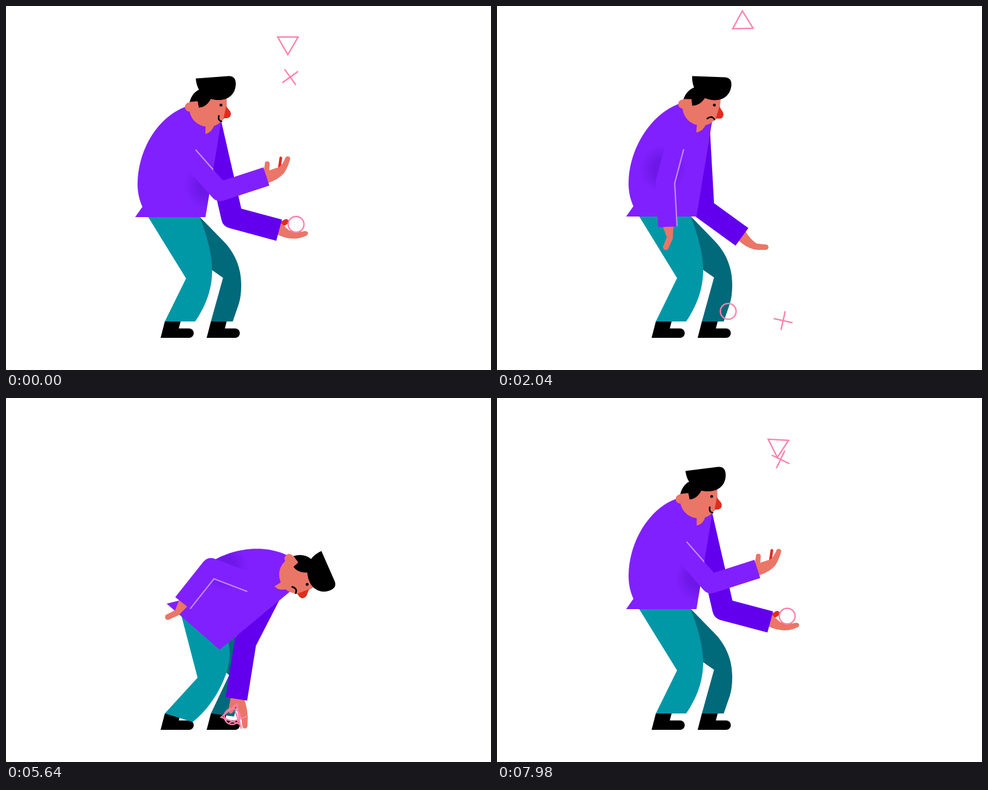
An HTML page that plays this animation: 800x600 px, repeating every 8000 ms.

```html
<!DOCTYPE html>
<html lang="en">
<head>
<meta charset="utf-8">
<title>Juggler</title>
<style>
html, body { margin: 0; width: 100%; height: 100%; overflow: hidden; background: #fff; }
svg { display: block; width: 100%; height: 100%; }
.skin { fill: #ea7667; }
.red { fill: none; stroke: #e02d1f; stroke-linecap: round; }
.arm { fill: none; stroke-linejoin: round; }
.toy { fill: none; stroke: #ff80ab; stroke-width: 2.3; }
</style>
</head>
<body>
<svg viewBox="0 0 800 600">
  <defs>
    <radialGradient id="dark">
      <stop offset=".4" stop-color="#5a0fd0" stop-opacity=".5"/>
      <stop offset="1" stop-color="#5a0fd0" stop-opacity="0"/>
    </radialGradient>
    <clipPath id="inTorso"><use href="#torso"/></clipPath>
    <clipPath id="inBody"><use href="#torso"/><use href="#legF"/></clipPath>
  </defs>
  <path d="M338 520H364L361 531.5H378A7.7 7.7 0 0 1 378 547H331Z"/>
  <path id="legB" fill="#00697a"/>
  <path d="M262 520H288L285 531.5H302A7.7 7.7 0 0 1 302 547H255Z"/>
  <path id="legF" fill="#0097a7"/>

  <g id="cupB">
    <path class="red" stroke-width="8.5" d="M457 358.500L462 355.500"/>
    <path class="skin" d="M453 357L467 370Q480 374 493 371C500 371 500 378 493 379.500Q472 389 446 376Z"/>
  </g>
  <path id="flatB" class="skin" d="M409 370Q417 384 428 391.500L444 393.300A4.400 4.400 0 0 1 444 402H432Q415 402 398 386Z"/>
  <circle id="fistB" class="skin" r="15"/>
  <path id="grabB" class="skin" d="M371 492L367 514C366 521 373 522 375 517L379 509Q389 521 390 541A4.300 4.300 0 0 0 398.500 541L399 526Q398 510 392 493Z"/>
  <path id="armB" class="arm" stroke="#6200ee" stroke-width="36"/>

  <path id="torso" fill="#8120ff"/>
  <g clip-path="url(#inTorso)"><circle id="shade" r="40" fill="url(#dark)"/></g>

  <g id="head">
    <path class="skin" d="M329 190V211Q341 208 344 194Z"/>
    <path class="skin" d="M302 158V166C302 186 316 199 334 199Q347 199 355 190L364 182V148H320Z"/>
    <path fill="#e02d1f" d="M363 165L370 174C373 181 368 185 364 185H359Z"/>
    <path d="M303 158Q307 142 322 136L340 149Q332 167 318 167.500L316 157Z"/>
    <circle class="skin" cx="302.500" cy="166.500" r="7.500"/>
    <path class="skin" d="M302 159L316 157.500L318 168L306 173Z"/>
    <path id="quiff" d="M313 119.500L367 115.500C376 115 379 121 379 128C379 145 367 155 351 155C333 155 315 145 313 119.500Z"/>
    <circle cx="354.500" cy="163.300" r="2.400"/>
    <path id="mouth" fill="none" stroke="#000" stroke-width="2.600" stroke-linecap="round"/>
  </g>

  <g id="cupF">
    <path id="ring" class="red" stroke-width="4.500" d="M454 251L451.500 266"/>
    <path class="skin" d="M424 280L427.500 260A4 4 0 0 1 435.500 260L434.500 271L452 265.500Q458 260 461.500 251A4.200 4.200 0 0 1 469.500 252.500Q466 266 459 276Q450 286 432 292Z"/>
  </g>
  <path id="restF" class="skin" d="M273 362L280 381L274.500 395A4.500 4.500 0 0 0 282.500 400L290 383L291 361Z"/>
  <path id="armF" class="arm" stroke="#8120ff" stroke-width="31.500"/>
  <g clip-path="url(#inBody)"><path id="crease" fill="none" stroke="#be8cff" stroke-width="2.200"/></g>

  <path id="tri" class="toy" d="M0 -19.500L16.800 9.700H-16.800Z"/>
  <path id="cross" class="toy" d="M-16 0H16M0 -16V16"/>
  <circle id="ball" class="toy" r="13"/>
</svg>
<script>
const $ = id => document.getElementById(id);
const set = (id, attrs) => { for (const k in attrs) $(id).setAttribute(k, attrs[k]); };
const clamp = v => Math.max(0, Math.min(1, v));
const lerp = (a, b, k) => a + (b - a) * k;
const ramp = (t, a, b) => clamp((t - a) / (b - a));
const ease = { in: k => k * k, out: k => k * (2 - k), io: k => k * k * (3 - 2 * k) };
const smooth = (t, a, b) => ease.io(ramp(t, a, b));
const mixList = (a, b, k) => a.map((v, i) => lerp(v, b[i], k));
const deg = (x, y) => Math.atan2(y, x) * 180 / Math.PI;
const turn = (x, y, a) => {
  const c = Math.cos(a * Math.PI / 180), s = Math.sin(a * Math.PI / 180);
  return [x * c - y * s, x * s + y * c];
};
// unit normal on the inner side of an arm
const side = (dx, dy) => { const l = Math.hypot(dx, dy); return [dy / l, -dx / l]; };

// torso: hem corner, angle; head: ear, angle, quiff angle; arms: shoulder, elbow, wrist
const high = { torso: [213, 348, 0], head: [301, 166, 0, 0], front: [301, 247, 353, 306, 429.5, 281], back: [337.5, 194, 373, 348.6, 450.5, 369.5] };
const proud = { ...high, head: [300.5, 166, -1.2, -1.5] };
const low = { torso: [214.5, 350.5, 1.3], head: [307, 173, 1, -5], front: [305, 253, 342.5, 324.5, 424, 323.5], back: [342, 203.6, 388.7, 346.7, 465.5, 351.5] };
const sad = { torso: [213, 347, 0], head: [305, 161, 5.4, 1], front: [293, 232, 277.5, 290.5, 281.5, 364], back: [333, 200, 340.5, 334.5, 404, 380.5] };
const angry = { torso: [213.5, 343.5, .6], head: [312, 153, 11.3, -1], front: [295.6, 225.5, 289.5, 285.3, 298, 369], back: [328, 200, 330, 284, 376.5, 294] };
const bent = { torso: [265, 339, 41], head: [466.5, 263, 58.5, 12], front: [403.5, 304.5, 338, 279.5, 291.5, 338], back: [439, 317, 395, 402.4, 380, 496] };
const reach = { ...bent, head: [474, 268, 60, 4], back: [441, 320, 441, 422, 458, 514] };
const ready = { torso: [213.5, 349, .7], head: [302, 170, -.5, -1.5], front: [303.6, 250, 344, 316, 423.5, 306], back: [339.7, 200, 382.7, 348.4, 461.5, 364] };

const mixPose = (a, b, k) => {
  const p = {};
  for (const part in a) p[part] = mixList(a[part], b[part], k);
  return p;
};
const acts = [[1410, low], [1850, sad], [2250, sad], [2900, angry], [4850, angry], [5340, reach],
  [5380, reach], [5620, bent], [5700, bent], [6500, ready], [6690, ready]];

const BEAT = 403, CYCLE = 1209, RISE = 433, RESTART = 7965;
const juggle = (t, top) => mixPose(top, low, (1 - Math.cos(2 * Math.PI * t / BEAT)) / 2);

function poseAt(t) {
  if (t < 1410) return juggle(t, high);
  if (t >= 6690) return mixPose(ready, juggle(t - RESTART, proud), smooth(t, 6690, 6950));
  const i = acts.findIndex(a => a[0] > t), [t0, p] = acts[i - 1], [t1, q] = acts[i];
  const pose = mixPose(p, q, smooth(t, t0, t1));
  if (t > 2900 && t < 4850) {
    const shake = Math.sin(Math.PI * (t - 3480) / 400) ** 2 * ramp(t, 2900, 3100) * (1 - ramp(t, 4600, 4850));
    pose.back[4] += 20 * shake;
    pose.back[5] -= 18 * shake;
    pose.head[2] -= 5 * shake;
  }
  return pose;
}

// rows: standing x, y, bent x, y, share of the hip's bob
const frontLeg = [[234, 347, 287, 350, 1], [297, 449, 316, 461, .5], [262, 520, 262, 520, 0], [312, 520, 308, 534, 0],
  [334, 488, 345, 505, .2], [340, 460, 368, 455, .5], [340, 436, 369, 425, .5],
  [340, 410, 369, 410, .7], [332, 380, 367, 400, 1], [319, 346, 363, 385, 1]];
const backLeg = [[319, 347, 350, 385, 1], [360, 389, 385, 395, .7], [378, 408, 398, 420, .5], [388, 432, 398, 440, .5],
  [388, 459, 394, 458, .5], [388, 476, 390, 475, .3], [386, 484, 387, 488, .2], [384, 491, 384, 497, .1],
  [374, 520, 376, 525, 0], [338, 520, 338, 520, 0], [358, 448, 368, 457, .5], [338, 434, 350, 440, .5]];

function drawLeg(id, rows, cmds, b, bob) {
  set(id, { d: rows.map(([x, y, u, v, k], i) =>
    `${cmds[i]}${lerp(x, u, b)} ${lerp(y, v, b) + bob * k * (1 - b)}`).join(' ') + 'Z' });
}

function drawTorso([x, y, a], ear) {
  const at = (px, py, dx = 0, dy = 0) => {
    const [u, v] = turn(px - 213, py - 348, a);
    return [x + u + dx, y + v + dy];
  };
  // the back arches as the neck stretches forward
  const n = at(302, 166), dx = ear[0] - n[0], dy = ear[1] - n[1], arch = -.35 * Math.max(0, dx);
  set('torso', { d: `M${at(213, 348)}L${at(329, 348)}L${at(355, 190)}L${at(345, 178)}L${ear[0] + 1},${ear[1] - 2}
    C${at(250, 180, dx * .7, dy * .5 + arch)} ${at(217, 240, 0, arch)} ${at(217, 293)}C${at(217, 308)} ${at(220, 320)} ${at(225, 331)}Z` });
}

const drawArm = (id, [a, b, c, d, e, f]) => set(id, { d: `M${a} ${b}L${c} ${d}L${e} ${f}` });

function drawFolds([sx, sy, ex, ey, wx, wy]) {
  const h = 15.5, m = side(ex - sx, ey - sy), n = side(wx - ex, wy - ey);
  const k = h / Math.max(.3, 1 + m[0] * n[0] + m[1] * n[1]);
  set('crease', { d: `M${sx + m[0] * h} ${sy + m[1] * h}L${ex + (m[0] + n[0]) * k} ${ey + (m[1] + n[1]) * k}L${wx + n[0] * h} ${wy + n[1] * h}` });
  const up = 20 / Math.hypot(sx - ex, sy - ey);
  set('shade', { cx: ex + (sx - ex) * up - m[0] * 9, cy: ey + (sy - ey) * up - m[1] * 9 });
}

// hands are drawn around a home wrist, then moved to the current one
const hang = (id, show, [, , , , wx, wy], a, hx, hy) => set(id, {
  transform: `translate(${wx} ${wy}) rotate(${a}) translate(${-hx} ${-hy})`,
  display: show ? 'inline' : 'none'
});

// apex: time of the top in either round; top: its height; off: place in the hand; grab: place when picked up
const toys = [
  { id: 'tri', apex: [-95, -129], top: 47, spin: [60, .204], off: [5, 2, -9], grab: [-6, 27, 21],
    fall: [[1410, 455, 178, 348], [1650, 446, 290, 400, 'in'], [2130, 396, 18, 496, 'out'], [2990, 453, 536, 480, 'in']] },
  { id: 'cross', apex: [211, 199], top: 51, spin: [54, .23], off: [-2, 0, 20], grab: [3, 34, 70],
    fall: [[1410, 467, 55, 18], [2052, 472, 535, 104, 'in'], [2300, 481, 535, 135, 'out']] },
  { id: 'ball', apex: [-568, -568], top: 50, spin: [0, 0], off: [0, 0, 0], grab: [-7, 29, 0],
    fall: [[1410, 490, 332, 0], [1620, 450, 250, 0, 'out'], [2065, 377.5, 533, 0, 'in']] }
];

function track(t, keys) {
  for (let i = 1; i < keys.length; i++) {
    const a = keys[i - 1], b = keys[i];
    if (t < b[0]) {
      const k = ramp(t, a[0], b[0]);
      return [lerp(a[1], b[1], k), lerp(a[2], b[2], ease[b[4]](k)), lerp(a[3], b[3], k)];
    }
  }
  return keys[keys.length - 1].slice(1, 4);
}

function toyAt(toy, t, wrist, palm) {
  const held = [palm[0] + toy.off[0], palm[1] + toy.off[1], toy.off[2]];
  const picked = [wrist[0] + toy.grab[0], wrist[1] + toy.grab[1], toy.grab[2]];
  if (t >= 1410 && t < 5640) return mixList(track(t, toy.fall), picked, smooth(t, 5380, 5620));
  if (t >= 5640 && t < 6690) return mixList(picked, held, smooth(t, 5750, 6350));
  const again = t >= 6690, clock = again ? t - RESTART : t;
  let u = clock - toy.apex[+again];
  if (!again) u = (u + RISE + CYCLE) % CYCLE - RISE;
  const spin = toy.spin[0] + toy.spin[1] * clock;
  const r = again ? lerp(toy.off[2], toy.id === 'cross' ? spin - 32 : spin, ramp(u, -RISE, -RISE + 200)) : spin;
  if (u < -RISE) return [held[0], held[1], r];
  const f = Math.min(u, 400);
  const x = f < 0 ? 466 + 24 * (-f / RISE) ** 3 : 466 - 10 * (f / 290) ** 2;
  const y = toy.top + .0015 * f * f;
  const k = u < 0 ? ramp(u, -RISE, -RISE + 60) : 1 - smooth(u, 400, 550);
  return [lerp(held[0], x, k), lerp(held[1], y, k), r];
}

function draw(t) {
  const { torso, head, front, back } = poseAt(t);
  const bend = clamp((torso[2] - 1.5) / 39.5), bob = torso[1] - 348;
  drawLeg('legF', frontLeg, ['M', 'L', 'L', 'L', 'C', '', '', 'C', '', ''], bend, bob);
  drawLeg('legB', backLeg, ['M', 'L', 'C', '', '', 'C', '', '', 'L', 'L', 'L', 'L'], bend, bob);
  drawTorso(torso, head);
  drawArm('armB', back);
  drawArm('armF', front);
  drawFolds(front);

  const fx = front[4] - front[2], fy = front[5] - front[3];
  const fa = deg(fx, fy), ba = deg(back[4] - back[2], back[5] - back[3]);
  const rest = fx < .6 * Math.hypot(fx, fy);
  hang('cupF', !rest, front, 1.6 * (fa + 17.2), 429.5, 281);
  hang('restF', rest, front, (fa + 360) % 360 - 86.9, 281.5, 364);
  set('ring', { display: t < 1600 || t > 7000 ? 'inline' : 'none' });

  const grip = t < 1600 || t >= 6000 ? 'cupB' : t < 2600 ? 'flatB' : t < 4950 ? 'fistB' : 'grabB';
  const cup = Math.max(-45, Math.min(45, 2.1 * (ba - 15.1)));
  hang('cupB', grip === 'cupB', back, cup, 450.5, 369.5);
  hang('flatB', grip === 'flatB', back, ba - 36, 404, 380.5);
  hang('fistB', grip === 'fistB', back, 0, -4.5, -2);
  hang('grabB', grip === 'grabB', back, ba - 98.8, 380, 496);

  set('head', { transform: `translate(${head[0]} ${head[1]}) rotate(${head[2]}) translate(-301 -166)` });
  set('quiff', { transform: `rotate(${head[3]} 340 150)` });
  const frown = smooth(t, 1450, 1600) - smooth(t, 7000, 7250);
  const m = mixList([351, 181, 349.5, 189.5, 355.5, 190], [345, 186.5, 352, 180, 357, 187], frown);
  set('mouth', { d: `M${m[0]} ${m[1]}Q${m[2]} ${m[3]} ${m[4]} ${m[5]}` });

  const wrist = [back[4], back[5]], [px, py] = turn(28, -9.5, cup);
  for (const toy of toys) {
    const [x, y, r] = toyAt(toy, t, wrist, [wrist[0] + px, wrist[1] + py]);
    set(toy.id, { transform: `translate(${x} ${y}) rotate(${r})` });
  }
}

const start = performance.now();
function frame() {
  draw((performance.now() - start) % 8000);
  requestAnimationFrame(frame);
}
frame();
</script>
</body>
</html>
```
